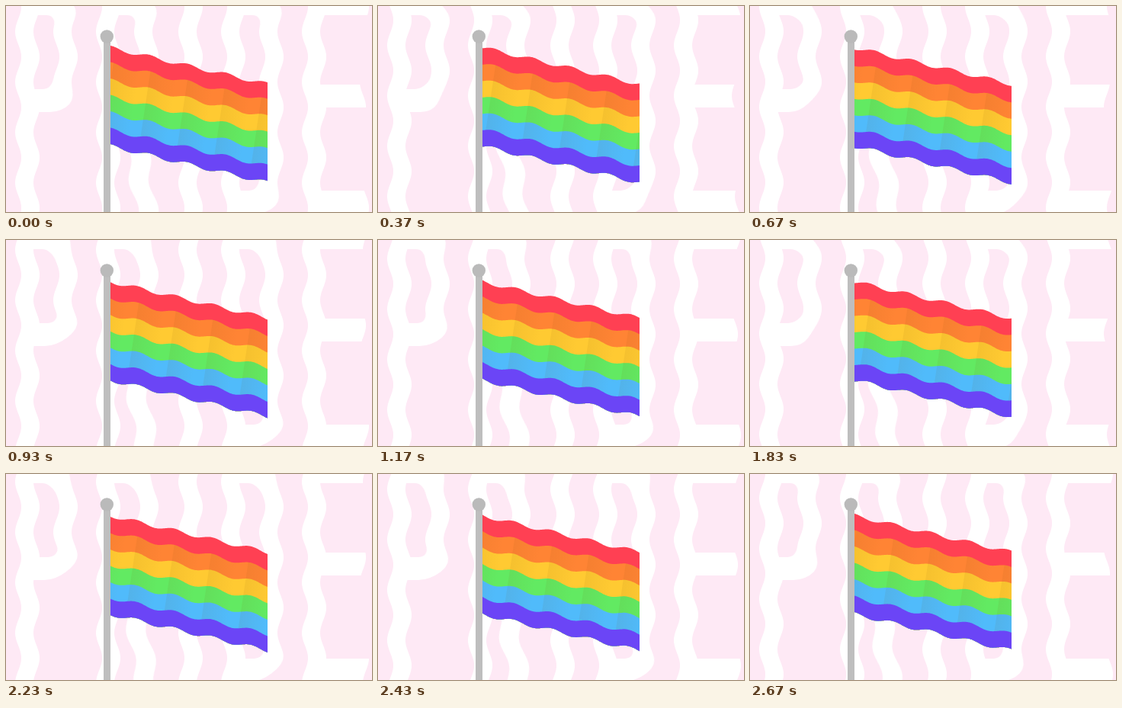
These frames come from a looping animation (480x270 px, 2710 ms). An HTML page with a canvas:

```html
<!DOCTYPE html>
<html lang="en">
<head>
<meta charset="utf-8">
<title>Pride flag</title>
<style>
html, body { margin: 0; width: 100%; height: 100%; overflow: hidden; background: #fee9f5; }
canvas { display: block; width: 100vw; height: 100vh; }
</style>
</head>
<body>
<canvas id="stage" width="480" height="270"></canvas>
<script>
const W = 480, H = 270, TAU = Math.PI * 2;
const LOOP = 2710, CYCLES = 2;
const ctx = document.getElementById('stage').getContext('2d');

const flag = { left: 137, right: 343, top: 54.6, slope: 0.2325, stripe: 21.5, amp: 2.6, wave: 50.2 };
const stripes = ['#ff4053', '#ff8434', '#ffca32', '#62ea62', '#50bbfb', '#6b45f6'];
const lettering = drawLettering();

// White letters on a transparent sheet, bent row by row later.
function drawLettering() {
  const sheet = document.createElement('canvas');
  sheet.width = W;
  sheet.height = H;
  const g = sheet.getContext('2d');
  const TOP = -18, BASE = 272, STEM = 24, BAR = 30, BOWL = 74;
  g.fillStyle = '#fff';

  const stem = x => g.fillRect(x, TOP, STEM, BASE - TOP);
  const bowl = (x, bottom) => {
    g.beginPath();
    g.roundRect(x, TOP, BOWL, bottom - TOP, [0, 36, 36, 0]);
    g.roundRect(x + STEM, TOP + BAR, BOWL - 2 * STEM, bottom - TOP - 2 * BAR, [0, 15, 15, 0]);
    g.fill('evenodd');
  };

  stem(16);
  bowl(16, 139);

  stem(122);
  bowl(122, 139);
  g.beginPath();
  g.moveTo(150, 130);
  g.lineTo(176, 130);
  g.lineTo(197, BASE);
  g.lineTo(171, BASE);
  g.fill();

  stem(230);

  stem(286);
  bowl(286, BASE);

  stem(392);
  g.fillRect(392, TOP, 80, BAR);
  g.fillRect(392, 103, 76, BAR);
  g.fillRect(392, BASE - BAR, 80, BAR);
  return sheet;
}

function drawBackground(phase) {
  ctx.fillStyle = '#fee9f5';
  ctx.fillRect(0, 0, W, H);
  for (let y = 0; y < H; y++) {
    const dx = 4 * Math.cos(TAU * (y / 66 - phase));
    ctx.drawImage(lettering, 0, y, W, 1, dx, y, W, 1);
  }
}

function edge(x, phase) {
  const d = x - flag.left;
  return flag.top + flag.slope * d - flag.amp * Math.cos(TAU * (phase + 0.02 - d / flag.wave));
}

// Path of the cloth between two stripe borders.
function clothPath(from, to, phase) {
  ctx.beginPath();
  for (let x = flag.left; x <= flag.right; x++) ctx.lineTo(x, edge(x, phase) + from * flag.stripe);
  for (let x = flag.right; x >= flag.left; x--) ctx.lineTo(x, edge(x, phase) + to * flag.stripe);
  ctx.closePath();
}

function drawFolds(phase) {
  ctx.save();
  clothPath(1, 5, phase);
  ctx.clip();
  ctx.transform(1, 0, -0.15, 1, 0.15 * 140, 0);
  const shade = ctx.createLinearGradient(0, 0, 36, 0);
  shade.addColorStop(0, 'rgba(120,70,0,0.07)');
  shade.addColorStop(1, 'rgba(120,70,0,0)');
  ctx.fillStyle = shade;
  for (let n = -1; n < 6; n++) {
    ctx.save();
    ctx.translate(flag.left - 6 + (n + phase) * flag.wave, 0);
    ctx.fillRect(0, 0, 36, H);
    ctx.restore();
  }
  ctx.restore();
}

function drawFlag(phase) {
  stripes.forEach((color, i) => {
    clothPath(i, stripes.length, phase);
    ctx.fillStyle = color;
    ctx.fill();
  });
  drawFolds(phase);
}

function drawPole() {
  ctx.fillStyle = '#bebebe';
  ctx.fillRect(128, 40, 9, H - 40);
  ctx.fillStyle = '#bababa';
  ctx.beginPath();
  ctx.arc(132.3, 40, 8.7, 0, TAU);
  ctx.fill();
}

function frame() {
  const phase = (performance.now() % LOOP) / LOOP * CYCLES % 1;
  drawBackground(phase);
  drawFlag(phase);
  drawPole();
  requestAnimationFrame(frame);
}
frame();
</script>
</body>
</html>
```
